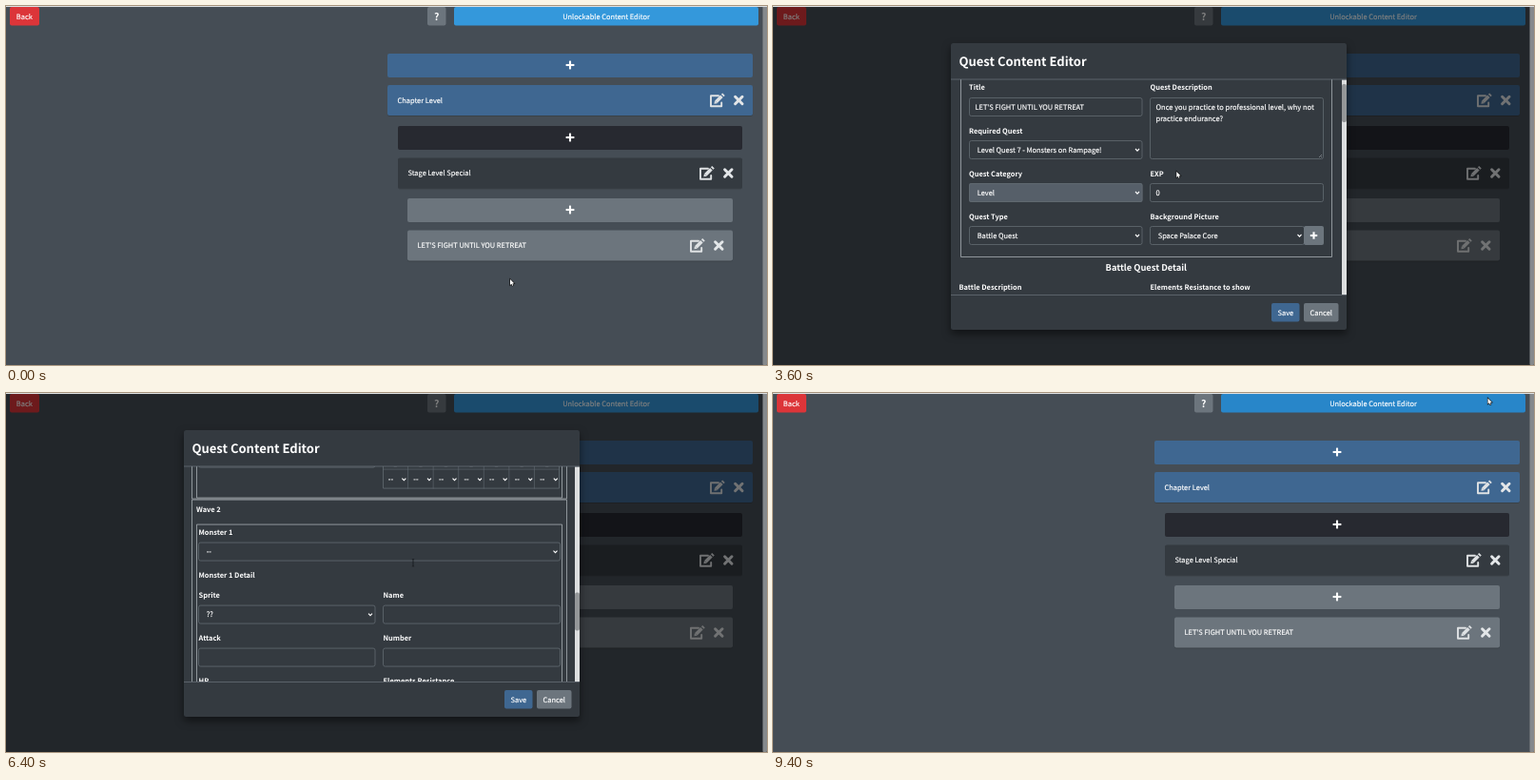
Recreate the animation shown at these times as an HTML page with a canvas. Size 800 by 377 pixels, loop 9.5 s.

```html
<!DOCTYPE html>
<html lang="en">
<head>
<meta charset="utf-8">
<title>Content Editor</title>
<style>
html, body { margin: 0; width: 100%; height: 100%; overflow: hidden; background: #454d55; }
canvas { display: block; width: 800px; height: 377px; }
</style>
</head>
<body>
<canvas id="stage"></canvas>
<script>
const W = 800, H = 377, LOOP = 9500;
const FONT = '"Noto Sans CJK JP", "Noto Sans CJK SC", "Source Sans Pro", "Noto Sans", sans-serif';
const BASE = 7.45;
const GREY = '#6c757d', PANEL = '#343a40', BLUE = '#3f6791', RULE = '#a8aeb3', EDGE = '#626b72';
const dpr = window.devicePixelRatio || 1;

function prepare(canvas) {
  canvas.width = W * dpr;
  canvas.height = H * dpr;
  const c = canvas.getContext('2d');
  c.scale(dpr, dpr);
  c.textRendering = 'geometricPrecision';
  return c;
}
const stage = prepare(document.getElementById('stage'));
const layer = document.createElement('canvas');
const modal = prepare(layer);
let g = stage;

// ---------- timing ----------
const clamp = v => Math.max(0, Math.min(1, v));
const part = (t, a, b) => clamp((t - a) / (b - a));
const easeOut = p => 1 - (1 - p) ** 2;
const smooth = p => p * p * (3 - 2 * p);

function track(keys, t, ease = p => p) {
  let i = 0;
  while (i < keys.length - 2 && t > keys[i + 1][0]) i++;
  const [a, ...from] = keys[i], [b, ...to] = keys[i + 1];
  const p = ease(part(t, a, b));
  return from.map((v, k) => v + (to[k] - v) * p);
}
const scrollKeys = [[3150, -28], [3450, 0], [4350, 0], [4800, 137], [5800, 472], [7000, 976], [7250, 1029]];
const pointerKeys = [[1050, 530, 287], [2050, 723, 254], [2700, 723, 254], [3500, 424, 174],
  [4100, 427, 174], [6500, 428, 174], [7000, 559.5, 272.5], [7350, 577, 322],
  [8550, 577, 322], [9400, 751.5, 5.5]];

// ---------- drawing helpers ----------
function rect(x, y, x2, y2, fill, r = 0) {
  g.fillStyle = fill;
  g.beginPath();
  g.roundRect(x, y, x2 - x, y2 - y, r);
  g.fill();
}
function frame(x, y, x2, y2, color, r = 0, width = 0.8) {
  g.strokeStyle = color;
  g.lineWidth = width;
  g.beginPath();
  g.roundRect(x + 0.5, y + 0.5, x2 - x - 1, y2 - y - 1, r);
  g.stroke();
}
function text(s, x, y, { size = BASE, bold = false, align = 'left', color = '#fff' } = {}) {
  const base = y + size * 0.36;
  g.font = `${bold ? 700 : 400} ${size}px ${FONT}`;
  g.textAlign = align;
  g.fillStyle = color;
  g.fillText(s, x, base);
  if (bold) return;
  // a hairline outline gives body text a slightly sturdier weight
  g.strokeStyle = color;
  g.lineWidth = 0.16;
  g.strokeText(s, x, base);
}
const label = (s, x, y) => text(s, x, y, { bold: true });

function line(points, color, width, cap = 'butt') {
  g.strokeStyle = color;
  g.lineWidth = width;
  g.lineCap = cap;
  g.beginPath();
  points.forEach(([x, y], i) => i ? g.lineTo(x, y) : g.moveTo(x, y));
  g.stroke();
}
function plus(x, y, r = 4.4) {
  line([[x - r, y], [x + r, y]], '#fff', 2.1);
  line([[x, y - r], [x, y + r]], '#fff', 2.1);
}
function cross(x, y) {
  line([[x - 3.7, y - 3.7], [x + 3.7, y + 3.7]], '#e3e6e8', 3, 'round');
  line([[x + 3.7, y - 3.7], [x - 3.7, y + 3.7]], '#e3e6e8', 3, 'round');
}
function pencil(x, y) {
  const c = '#dfe2e4';
  g.lineJoin = 'round';
  line([[x + 1, y - 4.8], [x - 7, y - 4.8], [x - 7, y + 6.3], [x + 4.2, y + 6.3], [x + 4.2, y + 2.4]], c, 1.9, 'round');
  line([[x - 1.6, y + 1.8], [x + 4.4, y - 4.2]], c, 3.6);
  line([[x + 5.2, y - 5], [x + 6.5, y - 6.3]], c, 3.6);
  g.fillStyle = c;
  g.beginPath();
  g.moveTo(x - 3.6, y + 3.8);
  g.lineTo(x - 3, y + 0.4);
  g.lineTo(x - 0.2, y + 3.2);
  g.fill();
  g.lineJoin = 'miter';
}
function chevron(x, y) {
  line([[x - 2, y - 1], [x, y + 1.1], [x + 2, y - 1]], '#fff', 1.1);
}

// ---------- page ----------
function bar(x, x2, y, fill) {
  rect(x, y, x2, y + 25, fill, 2);
  plus(593, y + 12);
}
function row(x, x2, y, fill, title) {
  rect(x, y + 0.6, x2, y + 33, 'rgba(0,0,0,.16)', 2);
  rect(x, y, x2, y + 32, fill, 2);
  text(title, x + 10.5, y + 16);
  pencil(x2 - 37, y + 16);
  cross(x2 - 14.7, y + 16);
}
function drawPage(t) {
  rect(0, 0, W, H, '#454d55');
  rect(4, 1, 35, 20.5, '#dc3539', 2);
  text('Back', 19.3, 11, { align: 'center' });
  rect(443, 1, 462.5, 20.5, GREY, 2);
  text('?', 452.8, 11, { size: 10.5, bold: true, align: 'center' });
  const [x, y] = track(pointerKeys, t, smooth);
  rect(471, 1, 791, 20.5, y < 20 && x > 471 ? '#2886c9' : '#3498db', 2);
  text('Unlockable Content Editor', 631, 11, { align: 'center' });

  bar(401, 785, 50, BLUE);
  row(401, 785, 83, BLUE, 'Chapter Level');
  bar(412, 774, 126, '#272930');
  row(412, 774, 159.5, PANEL, 'Stage Level Special');
  bar(422, 764, 202, GREY);
  row(422, 764, 235.5, GREY, "LET'S FIGHT UNTIL YOU RETREAT");
}

// ---------- form ----------
function input(x, x2, y, value = '', h = 20) {
  frame(x, y, x2, y + h, EDGE, 2);
  text(value, x + 6.5, y + 10);
}
function select(x, x2, y, value, fill) {
  if (fill) rect(x, y, x2, y + 20, fill, 2);
  frame(x, y, x2, y + 20, EDGE, 2);
  text(value, x + 8.7, y + 10);
  chevron(x2 - 5.5, y + 10);
}
function area(x, x2, y, h, lines) {
  frame(x, y, x2, y + h, EDGE, 2);
  lines.forEach((s, i) => text(s, x + 6.5, y + 10 + i * 12.5, { size: 7.53 }));
  line([[x2 - 5, y + h - 2], [x2 - 2, y + h - 5]], '#a5abb0', 0.6);
  line([[x2 - 3, y + h - 2], [x2 - 2, y + h - 3]], '#a5abb0', 0.6);
}

function dot(x, y, r, color = '#fff') {
  g.fillStyle = color;
  g.beginPath();
  g.arc(x, y, r, 0, 7);
  g.fill();
}
function drop(x, y, r) {
  g.fillStyle = '#fff';
  g.beginPath();
  g.moveTo(x, y - r * 2);
  g.quadraticCurveTo(x + r * 1.9, y + r, x, y + r);
  g.quadraticCurveTo(x - r * 1.9, y + r, x, y - r * 2);
  g.fill();
}
const elements = [
  ['#2c6da6', (x, y) => { drop(x - 2.4, y - 0.4, 1.6); drop(x + 2.4, y - 0.4, 1.6); drop(x, y + 4, 1.6); }],
  ['#d1131a', (x, y, c) => { drop(x, y + 2.4, 3.1); drop(x + 2.3, y, 1.4); dot(x, y + 2.8, 1.6, c); }],
  ['#643c20', (x, y) => { dot(x - 2.6, y - 0.8, 1.9); dot(x + 1.6, y - 2.6, 1.8); dot(x + 2.8, y + 1.6, 1.7); dot(x - 0.8, y + 3, 1.6); }],
  ['#257a40', (x, y) => {
    for (let i = 0; i < 3; i++) line([[x - 4 + i * 1.6, y + 1 + i * 1.7], [x + i, y - 1 + i * 1.6], [x + 3 + i * 0.6, y - 4.5 + i * 2.2]], '#fff', 1);
  }],
  ['#701b96', (x, y, c) => { dot(x, y, 4.4); dot(x + 1.8, y - 0.8, 3.6, c); dot(x + 2, y - 0.5, 1.5); }],
  ['#bfa145', (x, y, c) => {
    dot(x, y, 4.7, '#f7efcb');
    dot(x, y, 3.5, c);
    dot(x, y, 2.2, '#f7efcb');
  }],
  ['#3583c8', (x, y) => {
    for (let i = 0; i < 3; i++) {
      const a = Math.PI / 2 + i * Math.PI / 3, dx = Math.cos(a) * 4.8, dy = Math.sin(a) * 4.8;
      line([[x - dx, y - dy], [x + dx, y + dy]], '#fff', 1.1);
    }
    dot(x, y, 1.8);
  }]
];
function resistances(x2, y, value) {
  const x = 396, w = (x2 - x) / 7;
  frame(x, y, x2, y + 42, EDGE);
  line([[x, y + 21.5], [x2, y + 21.5]], EDGE, 0.6);
  elements.forEach(([color, glyph], i) => {
    const left = x + i * w, cx = left + w / 2, cy = y + 10.7;
    if (i) line([[left, y], [left, y + 42]], EDGE, 0.6);
    dot(cx, cy, 8, '#8f989e');
    dot(cx, cy, 7.4, color);
    glyph(cx, cy, color);
    text(value, left + 5.8, y + 32);
    chevron(left + w - 4.2, y + 32);
  });
}

function monster(n, y, { kind = '--', hp = '', res = '--' } = {}) {
  frame(200, y, 585, y + 227, RULE);
  label(`Monster ${n}`, 202.5, y + 9);
  select(202, 583, y + 19, kind);
  label(`Monster ${n} Detail`, 202.5, y + 54);
  label('Sprite', 202.5, y + 75);
  select(202, 388.5, y + 85, '??');
  label('Name', 396.5, y + 75);
  input(396, 583, y + 85);
  label('Attack', 202.5, y + 120);
  input(202, 388.5, y + 130);
  label('Number', 396.5, y + 120);
  input(396, 583, y + 130);
  label('HP', 202.5, y + 165);
  input(202, 388.5, y + 175, hp);
  label('Elements Resistance', 396.5, y + 165);
  resistances(582, y + 175, res);
}
function wave(n, y, first) {
  frame(195, y, 590, y + 481, RULE);
  label(`Wave ${n}`, 200, y + 11);
  monster(1, y + 26, first);
  monster(2, y + 253);
}

function drawForm() {
  frame(197, 76, 588, 264, RULE);
  label('Title', 206, 85.5);
  input(206, 388.5, 96, "LET'S FIGHT UNTIL YOU RETREAT");
  label('Quest Description', 396.5, 85.5);
  area(396, 579, 96, 65, ['Once you practice to professional level, why not', 'practice endurance?']);
  label('Required Quest', 206, 131);
  select(206, 388.5, 141, 'Level Quest 7 - Monsters on Rampage!');
  label('Quest Category', 206, 176);
  select(206, 388.5, 186, 'Level', '#565f69');
  label('EXP', 396.5, 176);
  input(396, 579, 186, '0');
  label('Quest Type', 206, 221);
  select(206, 388.5, 231, 'Battle Quest');
  label('Background Picture', 396.5, 221);
  select(396, 559, 231, 'Space Palace Core');
  rect(558, 231, 579, 251, GREY, 2);
  plus(568.5, 241, 3.7);

  text('Battle Quest Detail', 392.3, 274.5, { size: 9.3, bold: true, align: 'center' });
  label('Battle Description', 195.5, 295.5);
  area(195, 388.5, 305, 42, ["This quest doesn't care how powerful you are!", "Because! You can't hit it and it can't also hit you!"]);
  label('Elements Resistance to show', 396.5, 295.5);
  resistances(589, 305, 'Nu');
  wave(1, 355, { kind: 'Immortal Weak Mutant Egul', hp: '10', res: 'Nu' });
  wave(2, 836);
}

function drawModal(t) {
  g = modal;
  g.clearRect(0, 0, W, H);
  g.shadowColor = 'rgba(0,0,0,.5)';
  g.shadowBlur = 8.5 * dpr;
  g.shadowOffsetY = 4.2 * dpr;
  rect(187, 39, 603, 340, PANEL, 2.5);
  g.shadowColor = 'transparent';
  text('Quest Content Editor', 195.5, 58, { size: 13, bold: true });

  const [s] = track(scrollKeys, t);
  g.save();
  g.beginPath();
  g.rect(187, 77, 416, 226);
  g.clip();
  g.translate(0, -s);
  drawForm();
  g.restore();

  const top = 77 + (s + 28) * 0.176;
  rect(598, 77.5, 603, 303, '#dcdedf');
  rect(598, top, 603, Math.min(303, top + 40), '#949799', 2);
  line([[187, 77], [603, 77]], GREY, 0.7);
  line([[187, 303.5], [603, 303.5]], GREY, 0.7);
  rect(524, 312, 553.5, 331.5, BLUE, 2);
  text('Save', 538.8, 322, { align: 'center' });
  rect(558, 312, 594.5, 331.5, GREY, 2);
  text('Cancel', 576.2, 322, { align: 'center' });
  g = stage;
}

// ---------- pointer ----------
function drawPointer(t) {
  const [x, y] = track(pointerKeys, t, smooth);
  if (t > 4100 && t < 6500) {
    line([[x, y + 0.5], [x, y + 8]], '#15181b', 0.8);
    line([[x - 1.2, y + 0.5], [x + 1.2, y + 0.5]], '#15181b', 0.6);
    line([[x - 1.2, y + 8], [x + 1.2, y + 8]], '#15181b', 0.6);
    return;
  }
  const shape = [[0, 0], [0, 6], [1.4, 4.8], [2.3, 6.8], [3.2, 6.4], [2.4, 4.4], [4.2, 4.2]];
  g.beginPath();
  shape.forEach(([dx, dy]) => g.lineTo(x + dx, y + dy));
  g.closePath();
  g.strokeStyle = '#111';
  g.lineWidth = 1.2;
  g.stroke();
  g.fillStyle = '#fff';
  g.fill();
}

function draw(t) {
  drawPage(t);
  const dim = 0.5 * part(t, 2475, 2625) * (1 - part(t, 8850, 9000));
  if (dim) rect(0, 0, W, H, `rgba(0,0,0,${dim})`);
  rect(795.5, 0, 800, H, '#85898c', 1);
  rect(0, 0, W, 0.9, '#dcdfe1');

  const alpha = part(t, 2640, 2790) * (1 - part(t, 8550, 8700));
  if (alpha) {
    const shift = -26 * (1 - easeOut(part(t, 2640, 2940)) + easeOut(part(t, 8550, 8850)));
    drawModal(t);
    g.globalAlpha = alpha;
    g.drawImage(layer, 0, shift, W, H);
    g.globalAlpha = 1;
  }
  drawPointer(t);
}

const start = performance.now();
function tick() {
  draw((performance.now() - start) % LOOP);
  requestAnimationFrame(tick);
}
tick();
</script>
</body>
</html>
```
